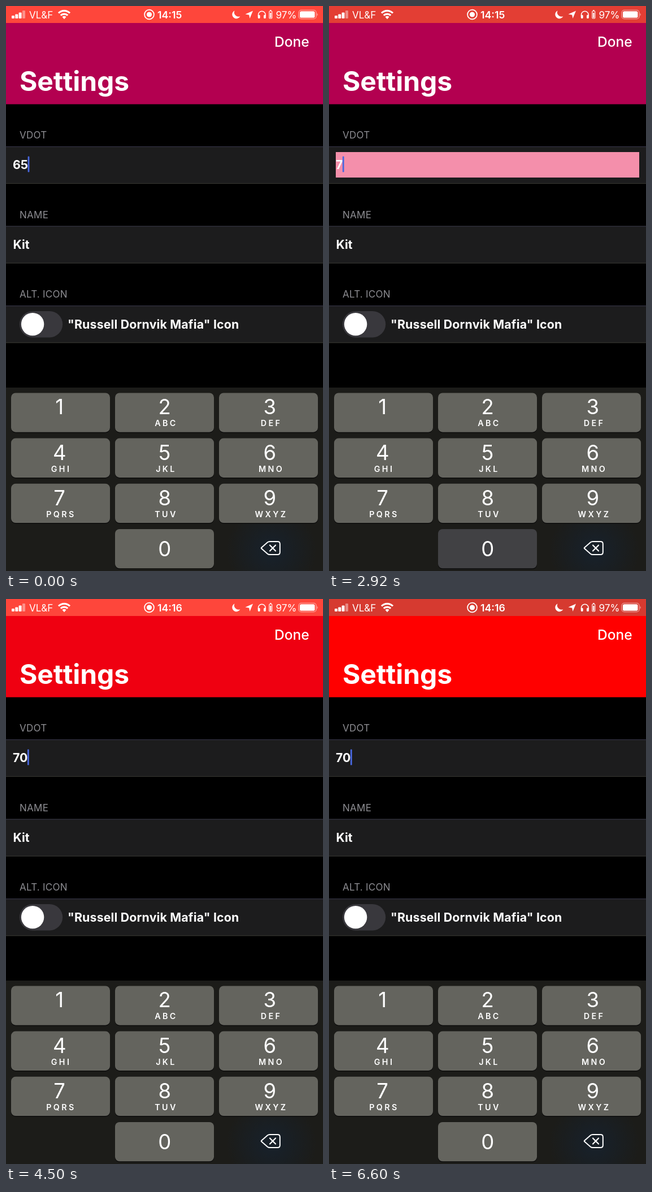
An HTML page that plays this animation: 561x998 px, repeating every 6.62 s.

```html
<!DOCTYPE html>
<html lang="en">
<head>
<meta charset="utf-8">
<title>Settings</title>
<style>
  html, body { margin: 0; width: 100%; height: 100%; overflow: hidden; background: #000; }
  svg { display: block; width: 561px; height: 998px; font-family: Inter, Roboto, sans-serif; fill: #fff; }
  text { white-space: pre; }
  .line { fill: none; stroke: #fff; }
  .status { font-size: 17px; }
  .title { font-size: 48px; font-weight: 700; letter-spacing: -.1px; }
  .done { font-size: 24.5px; font-weight: 500; }
  .label { font-size: 17px; letter-spacing: .25px; fill: #8d8d92; }
  .value { font-size: 21.3px; font-weight: 700; }
  .digit { font-size: 36.5px; text-anchor: middle; }
  .letters { font-size: 14.3px; font-weight: 600; letter-spacing: 3.4px; text-anchor: middle; }
</style>
</head>
<body>
<svg viewBox="0 0 561 998">
  <radialGradient id="glow">
    <stop offset=".2" stop-color="#182028"/>
    <stop offset="1" stop-color="#182028" stop-opacity="0"/>
  </radialGradient>
  <rect width="561" height="998" fill="#000"/>
  <rect id="header" y="30" width="561" height="143.5"/>
  <rect id="bar" width="561" height="30"/>

  <g class="status">
    <rect x="10" y="17" width="5" height="5" rx="1"/>
    <rect x="16.3" y="14.5" width="5" height="7.5" rx="1"/>
    <rect x="22.6" y="11.5" width="5" height="10.5" rx="1"/>
    <rect x="29" y="8" width="5" height="14" rx="1" opacity=".4"/>
    <text x="41" y="21.5">VL&amp;F</text>
    <g class="line" stroke-width="3.2">
      <path d="M93 12.5a14 14 0 0 1 20 0"/>
      <path d="M96.8 16.6a8.8 8.8 0 0 1 12.4 0"/>
    </g>
    <path d="M99.5 19.3a5 5 0 0 1 7 0l-3.5 3.9z"/>
    <circle class="line" cx="253.5" cy="15" r="8.4" stroke-width="1.8"/>
    <circle cx="253.5" cy="15" r="4.6"/>
    <text id="clock" x="268" y="21.5" font-size="17.8" font-weight="600"></text>
    <path d="M404.5 8.2a7.4 7.4 0 1 0 9.8 10a7.6 7.6 0 0 1-9.8-10z"/>
    <path d="M437 8.5l-5.6 13.5-1.2-6.2-6.7-1.4z"/>
    <path class="line" d="M446.5 18v-2.5a6.3 6.3 0 0 1 12.6 0v2.5" stroke-width="1.5"/>
    <rect x="445.8" y="15.7" width="3.8" height="6.3" rx="1.5"/>
    <rect x="456" y="15.7" width="3.8" height="6.3" rx="1.5"/>
    <rect class="line" x="465.8" y="9" width="5" height="13" rx="1.2" stroke-width="1.1"/>
    <rect x="467" y="7" width="2.6" height="1.6"/>
    <rect x="467.2" y="12" width="2.2" height="8.8"/>
    <text x="477.5" y="21.5" font-size="17.2">97%</text>
    <rect class="line" x="518" y="7.2" width="31" height="15.6" rx="4.5" stroke-width="1.1" opacity=".6"/>
    <rect x="520" y="9.2" width="26.5" height="11.6" rx="2.6"/>
    <path d="M550.5 12.4q2.4 2.6 0 5.2z" opacity=".6"/>
  </g>

  <text class="done" x="475" y="71.5">Done</text>
  <text class="title" x="24" y="150">Settings</text>

  <g id="rows"></g>

  <rect id="pink" x="12" y="258" width="537" height="45" fill="#f48fab"/>
  <text id="hint" class="value" x="12.5" y="288" fill="#eda6b7">What's your VDOT?</text>
  <text id="vdot" class="value" x="12" y="288"></text>
  <rect id="caret" y="265.5" width="2.8" height="28" rx="1.2" fill="#4968e0"/>
  <text class="value" x="12.5" y="428.5">Kit</text>
  <rect x="24" y="539" width="76.2" height="46.4" rx="23.2" fill="#39383d"/>
  <circle cx="47.1" cy="562.1" r="20.2"/>
  <text class="value" x="109" y="569.5" letter-spacing=".18">"Russell Dornvik Mafia" Icon</text>

  <rect y="674" width="561" height="324" fill="#1c1c19"/>
  <circle cx="470" cy="962" r="80" fill="url(#glow)"/>
  <g id="keys"></g>
  <path id="erase" d="M452.4 956.4l10.2-8.8q1.8-1.6 4.2-1.6h13.8q4.2 0 4.2 4.2v14.6q0 4.2-4.2 4.2h-13.8q-2.4 0-4.2-1.6l-10.2-8.8q-1.4-1.1 0-2.2z" stroke="#fff" stroke-width="2"/>
  <path id="cross" class="line" d="M467 952.5l10 10m0-10l-10 10" stroke-width="2.2" stroke-linecap="round"/>
</svg>
<script>
const LOOP = 6620, KEY = '#64645e', PRESSED = '#414144';
const $ = id => document.getElementById(id);
const clamp = v => Math.min(1, Math.max(0, v));
const mix = (a, b, p) => `rgb(${a.map((v, i) => Math.round(v + (b[i] - v) * p))})`;
const within = (t, a, b) => t >= a && t < b;

$('rows').innerHTML = ['VDOT', 'NAME', 'ALT. ICON'].map((name, i) => {
  const y = 248 + i * 140.6;
  return `<text class="label" x="24" y="${y - 14}">${name}</text>
    <rect y="${y}" width="561" height="66" fill="#1c1c1d"/>
    <rect y="${y}" width="561" height="1" fill="#38374a"/>
    <rect y="${y + 65}" width="561" height="1" fill="#383832"/>`;
}).join('');

const letters = ['', 'ABC', 'DEF', 'GHI', 'JKL', 'MNO', 'PQRS', 'TUV', 'WXYZ'];
// Labels are centred on thirds of the screen, slightly off the key centres
const key = (digit, col, row, base, sub) => {
  const x = 9 + col * 184, y = 683.4 + row * 80.2, mid = 94.7 + col * 186;
  return `
    <rect x="${x}" y="${y + 1.5}" width="175" height="69.3" rx="8" fill="#0d0d0d"/>
    <rect id="key${digit}" x="${x}" y="${y}" width="175" height="69.3" rx="8"/>
    <text class="digit" x="${mid}" y="${y + base}">${digit}</text>
    <text class="letters" x="${mid + 2.8}" y="${y + 58.9}">${sub}</text>`;
};
$('keys').innerHTML = letters.map((sub, i) =>
  key(i + 1, i % 3, Math.floor(i / 3), 37.9, sub)
).join('') + key(0, 1, 3, 47.5, '');
for (let i = 0; i < 10; i++) $('key' + i).style.fill = KEY;

// [time, field content] after each edit
const edits = [[-600, '65'], [1140, '6'], [1640, ''], [2520, '7'], [2960, '70']];

function draw(t) {
  const [since, value] = edits.filter(e => e[0] <= t).pop();
  $('vdot').textContent = value;
  $('pink').style.opacity = +(value.length < 2);
  $('hint').style.opacity = +(value === '');
  $('clock').textContent = t < 3300 ? '14:15' : '14:16';

  // The caret stays lit after an edit, then blinks once a second
  const idle = t - since, phase = idle % 1000;
  const off = idle < 1000 ? 0 : clamp((phase - 30) / 60) * clamp((520 - phase) / 60);
  $('caret').style.opacity = 1 - off;
  $('caret').setAttribute('x', 12 + (value ? $('vdot').getComputedTextLength() - .5 : 0));

  const p = clamp((t - 3200) / 1850);
  $('header').style.fill = mix([179, 0, 80], [255, 0, 0], p * p * (3 - 2 * p));
  const pulse = (1 - Math.cos((t + 200) / 4500 * 2 * Math.PI)) / 2;
  $('bar').style.fill = mix([255, 70, 59], [214, 58, 48], pulse);

  const erasing = within(t, 1090, 1960);
  $('erase').style.fill = erasing ? '#fff' : 'none';
  $('cross').style.stroke = erasing ? '#1b1b1a' : '#fff';
  $('key7').style.fill = within(t, 2400, 2540) ? PRESSED : KEY;
  $('key0').style.fill = within(t, 2860, 2980) ? PRESSED : KEY;
}

function tick() {
  draw(performance.now() % LOOP);
  requestAnimationFrame(tick);
}
tick();
</script>
</body>
</html>
```
